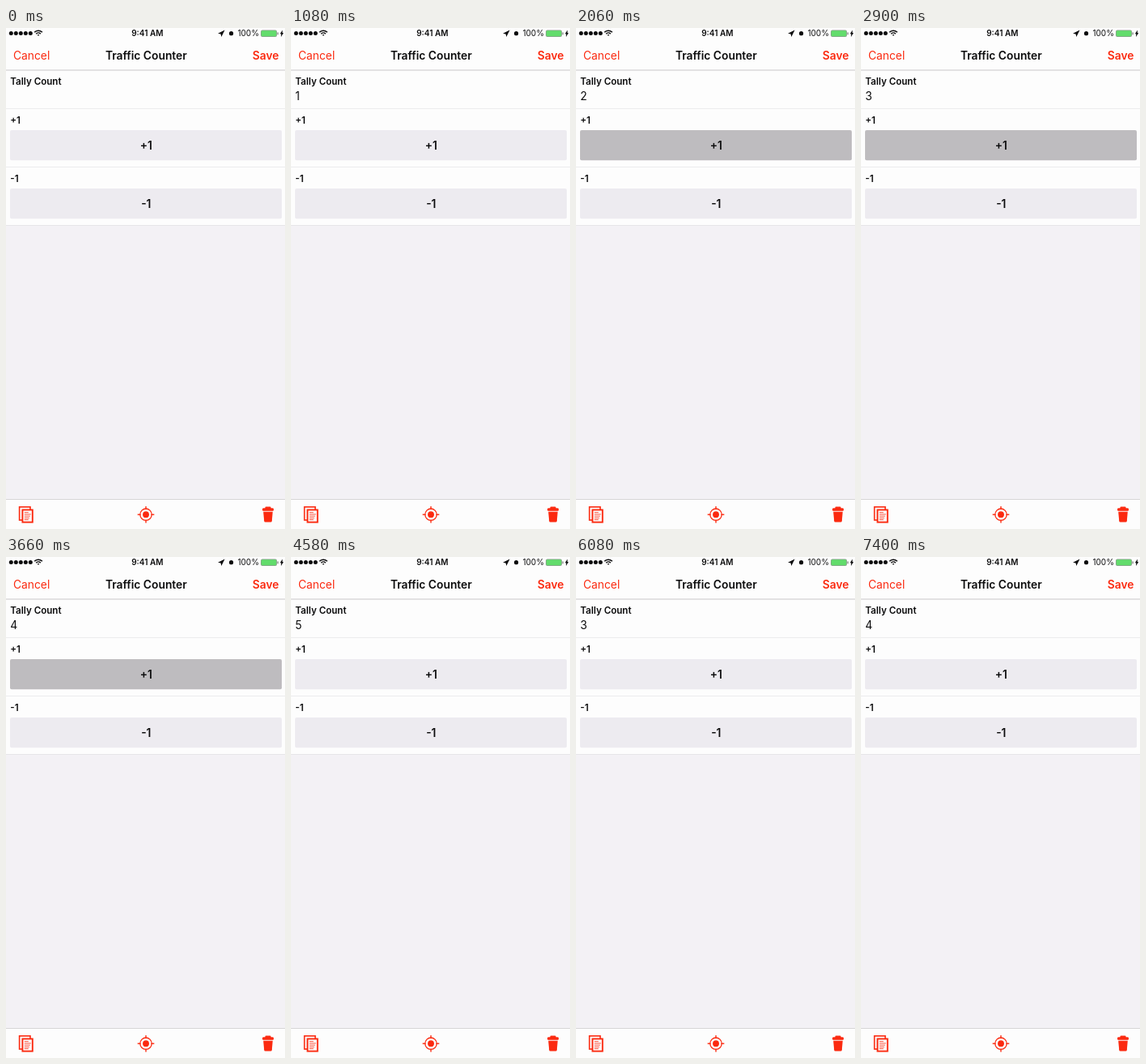
Write an HTML page with a canvas that moves like this. It is 345 px wide and 618 px high and loops after 8000 ms.

```html
<!DOCTYPE html>
<html lang="en">
<head>
<meta charset="utf-8">
<title>Traffic Counter</title>
<style>
  html, body { margin: 0; width: 100%; height: 100%; overflow: hidden; background: #f3f1f5; }
  canvas { display: block; width: 345px; height: 618px; }
</style>
</head>
<body>
<canvas id="stage"></canvas>
<script>
const W = 345, H = 618, MID = 173.3, LOOP = 8000;
const RED = '#fb2a10', INK = '#0c0c0d', PAPER = '#fdfdfd', BACK = '#f3f1f5';
const FONT = 'Inter, "Liberation Sans", sans-serif';
const STATUS = 10, LABEL = 11.6, BODY = 13.8;
const BAR = 52, ROW = 72, FIRST_ROW = 99, TOOLS = 581;

// Key of each tap, when it goes down, how long it is held
const TAPS = [
  ['+', 500, 120], ['+', 1260, 150], ['+', 2060, 200], ['+', 2900, 140],
  ['+', 3660, 110], ['-', 5000, 90], ['-', 5930, 150], ['+', 7310, 90]
];

const canvas = document.getElementById('stage');
const ctx = canvas.getContext('2d');
const dpr = window.devicePixelRatio || 1;
canvas.width = W * dpr;
canvas.height = H * dpr;
ctx.scale(dpr, dpr);

function rect(x, y, w, h, color, r = 0) {
  ctx.fillStyle = color;
  ctx.beginPath();
  ctx.roundRect(x, y, w, h, r);
  ctx.fill();
}

function frame(x, y, w, h, width) {
  rect(x, y, w, h, PAPER);
  ctx.strokeStyle = RED;
  ctx.lineWidth = width;
  ctx.strokeRect(x, y, w, h);
}

function dot(x, y, r, color) {
  ctx.fillStyle = color;
  ctx.beginPath();
  ctx.arc(x, y, r, 0, Math.PI * 2);
  ctx.fill();
}

function arc(x, y, r, from, to, color, width) {
  ctx.strokeStyle = color;
  ctx.lineWidth = width;
  ctx.beginPath();
  ctx.arc(x, y, r, from, to);
  ctx.stroke();
}

// Runs a drawing with its origin at x, y and turned by an angle
function at(x, y, angle, paint) {
  ctx.save();
  ctx.translate(x, y);
  ctx.rotate(angle);
  paint();
  ctx.restore();
}

function poly(color, ...points) {
  ctx.fillStyle = color;
  ctx.beginPath();
  for (const [x, y] of points) ctx.lineTo(x, y);
  ctx.fill();
}

function text(str, x, y, size, weight = 400, color = INK, align = 'left') {
  ctx.font = `${weight} ${size}px ${FONT}`;
  ctx.textAlign = align;
  ctx.fillStyle = color;
  ctx.fillText(str, x, y);
}

function statusBar() {
  for (let i = 0; i < 5; i++) dot(6.3 + i * 6, 6.6, 2.5, INK);
  for (let r = 1; r < 8; r += 2.8) {
    arc(40, 9.8, r, -Math.PI * 0.76, -Math.PI * 0.24, INK, 1.6);
  }

  text('9:41 AM', MID + 1.5, 10.4, STATUS, 600, INK, 'center');
  text('100%', 313, 10.4, STATUS, 400, INK, 'right');
  at(267, 6, Math.PI / 4, () => poly(INK, [0, -5], [3, 4], [0, 2], [-3, 4]));
  dot(278.5, 6.7, 2.6, INK);

  rect(315, 2.5, 20, 8.5, '#8c9a8e', 2);
  rect(315.7, 3.2, 18.6, 7.1, '#62dc6c', 1.4);
  rect(335.5, 5.2, 1.2, 3.2, '#777', 0.6);
  for (const turn of [0, Math.PI]) {
    at(341, 6.7, turn, () => poly(INK, [1, -4.2], [-2.2, 0.6], [0.6, 0.6]));
  }
}

function navBar() {
  rect(0, 0, W, BAR, PAPER);
  statusBar();
  text('Cancel', 9, 38.8, BODY, 400, RED);
  text('Traffic Counter', MID, 38.8, BODY, 600, INK, 'center');
  text('Save', 337.5, 38.8, BODY, 600, RED, 'right');
  rect(0, BAR - 0.5, W, 1, '#c9c8ca');
}

function buttonRow(label, y, pressed) {
  rect(0, y, W, 1, '#ececee');
  text(label, 5.3, y + 19, LABEL, 600);
  rect(5, y + 27, 336, 37.3, pressed ? '#bebcbf' : '#edebf0', 2);
  text(label, MID, y + 51, BODY, 600, INK, 'center');
}

function pagesIcon() {
  frame(16.6, 590.8, 13.4, 16.2, 1.6);
  frame(20.4, 594.4, 12.4, 15.2, 1.9);
  for (let i = 0; i < 5; i++) rect(22.8, 597.3 + i * 2.2, 5 + i * 3 % 4, 0.8, RED);
}

function targetIcon() {
  at(173, 600.2, 0, () => {
    dot(0, 0, 3.9, RED);
    arc(0, 0, 7.2, 0, Math.PI * 2, RED, 1.3);
    for (let i = 0; i < 4; i++) {
      ctx.rotate(Math.PI / 2);
      rect(6.5, -0.7, 3.8, 1.4, RED);
    }
  });
}

function trashIcon() {
  at(324, 596.8, 0, () => {
    rect(-3.6, -6.2, 7.2, 3, RED, 1.2);
    rect(-7, -4.6, 14, 3.6, RED, 1.4);
    poly(RED, [-5.8, 0], [5.8, 0], [4.8, 11], [-4.8, 11]);
    rect(-4.8, 9, 9.6, 3.8, RED, 1.6);
  });
}

function toolBar() {
  rect(0, TOOLS, W, H - TOOLS, PAPER);
  rect(0, TOOLS, W, 1, '#d6d5d7');
  pagesIcon();
  targetIcon();
  trashIcon();
}

function draw(t) {
  const done = TAPS.filter(([, down, hold]) => t >= down + hold);
  const count = done.reduce((sum, [key]) => sum + Number(key + 1), 0);
  const [held] = TAPS.find(([, down, hold]) => t >= down && t < down + hold) || [];

  rect(0, 0, W, H, BACK);
  rect(0, BAR, W, FIRST_ROW + 2 * ROW - BAR, PAPER);
  rect(0, FIRST_ROW + 2 * ROW, W, 1, '#e6e5e8');

  navBar();
  text('Tally Count', 5.3, 70, LABEL, 600);
  if (done.length) text(count, 5.3, 89.2, BODY);
  ['+', '-'].forEach((key, i) => buttonRow(key + 1, FIRST_ROW + i * ROW, held === key));
  toolBar();
}

const start = performance.now();
function tick() {
  draw((performance.now() - start) % LOOP);
  requestAnimationFrame(tick);
}
tick();
</script>
</body>
</html>
```
